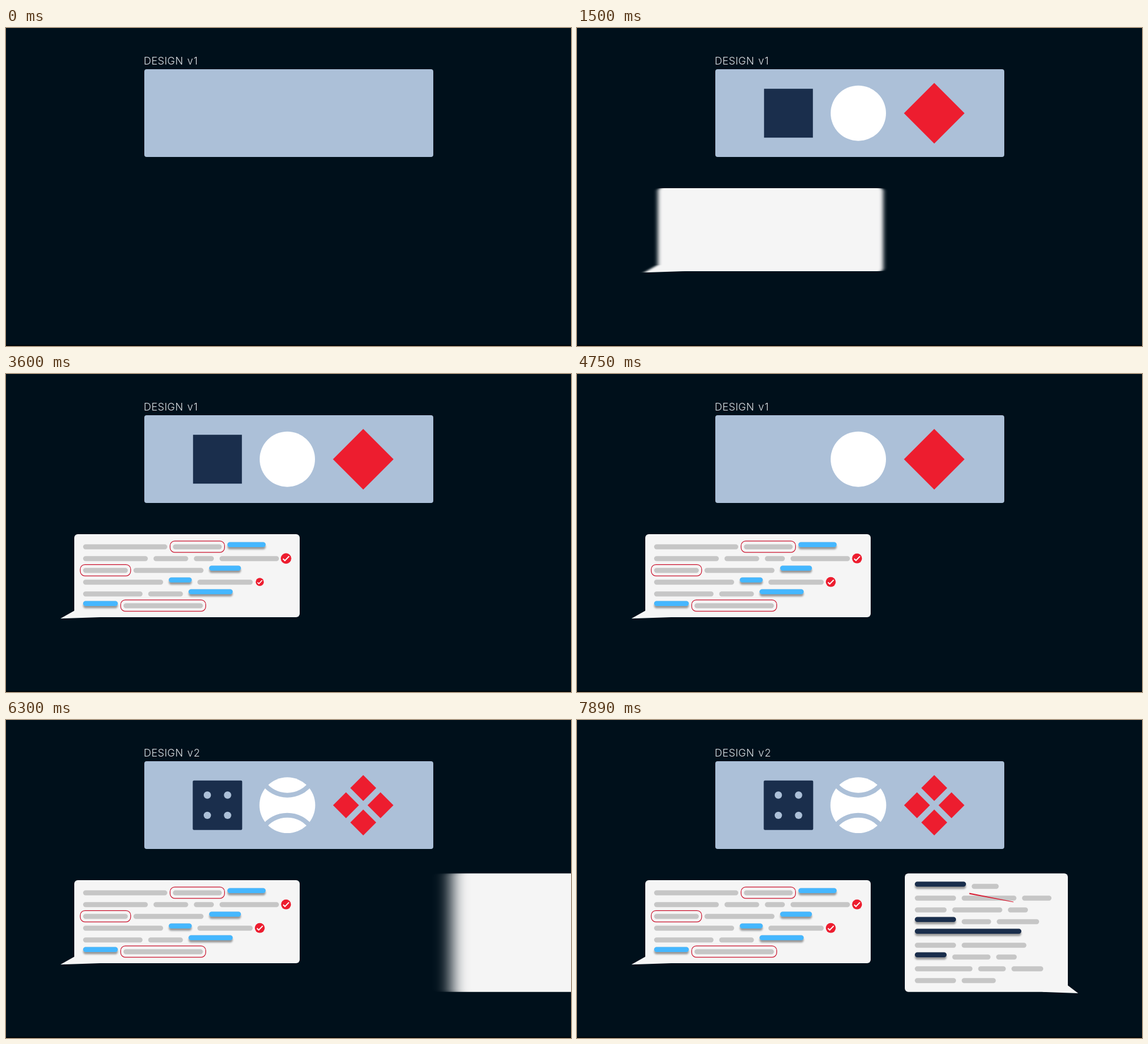
Animation, 960 px wide and 540 px high, one loop 7.99 s. Source, as an HTML page:

```html
<!DOCTYPE html>
<html lang="en">
<head>
<meta charset="utf-8">
<title>Design review</title>
<style>
  html, body { margin: 0; width: 100%; height: 100%; overflow: hidden; background: #00101b; }
  svg { display: block; width: 960px; height: 540px; }
  text { font: 300 17.6px Inter, "Liberation Sans", sans-serif; letter-spacing: 0.3px; fill: #dfe2e6; }
</style>
</head>
<body>
<svg id="stage" viewBox="0 0 960 540" xmlns="http://www.w3.org/2000/svg">
  <defs>
    <filter id="soft" x="-20%" y="-100%" width="140%" height="300%"><feGaussianBlur stdDeviation="1.4"/></filter>
  </defs>
  <rect width="960" height="540" fill="#00101b"/>
  <rect y="538" width="960" height="2" fill="#000509"/>
  <text x="234" y="62">DESIGN</text>
  <text x="308" y="62">v</text>
  <text id="one" x="318.7" y="62">1</text>
  <text id="two" x="318.7" y="62">2</text>
  <rect x="235" y="70" width="491" height="149" rx="4" fill="#acc0d8"/>
</svg>
<script>
const LOOP = 7990, FRAME = 50, TYPING = 30;
const RED = '#ed1d2f', NAVY = '#1a2e4c', BLUE = '#45b7ff', GREY = '#c6c6c6', PANEL = '#acc0d8';
const stage = document.getElementById('stage');
const defs = stage.querySelector('defs');

function set(node, attrs) {
  for (const key in attrs) node.setAttribute(key, attrs[key]);
}
function add(parent, tag, attrs = {}) {
  const node = document.createElementNS('http://www.w3.org/2000/svg', tag);
  set(node, attrs);
  parent.append(node);
  return node;
}
const show = (node, on) => set(node, { visibility: on ? 'visible' : 'hidden' });
const clamp = v => Math.max(0, Math.min(1, v));

// Progress in equal held steps; the first step is already visible at `start`.
const progress = (t, start, steps, hold = FRAME) =>
  clamp((Math.floor((t - start) / hold) + 1) / steps);

// Ease out with an overshoot.
const back = u => 1 + 2.7 * (u - 1) ** 3 + 1.7 * (u - 1) ** 2;

function place(node, x, y, scale) {
  show(node, scale > 0);
  set(node, { transform: `translate(${x} ${y}) scale(${scale})` });
}

// Shapes, each drawn around its own centre.
const diamond = (parent, x, y, r) =>
  add(parent, 'path', { d: `M${x} ${y - r}l${r} ${r}l${-r} ${r}l${-r} ${-r}z`, fill: RED });
const square = (parent, half, rx) =>
  add(parent, 'rect', { x: -half, y: -half, width: 2 * half, height: 2 * half, rx, fill: NAVY });
const disc = (parent, r, fill, cx = 0, cy = 0) => add(parent, 'circle', { cx, cy, r, fill });

const drawPlain = [
  g => square(g, 41.5, 0),
  g => disc(g, 47, '#fff'),
  g => diamond(g, 0, 0, 51.5)
];
const drawDetailed = [
  g => {
    square(g, 42, 2);
    for (const x of [-1, 1]) for (const y of [-1, 1]) disc(g, 6.2, PANEL, x * 17.2, y * 17.2);
  },
  g => {
    disc(g, 47.4, '#fff');
    for (const flip of [-1, 1])
      add(g, 'path', {
        d: 'M-40 -37A50 50 0 0 0 40 -37', transform: `scale(1 ${flip})`,
        fill: 'none', stroke: PANEL, 'stroke-width': 8
      });
  },
  g => {
    for (const side of [-29.3, 29.3]) {
      diamond(g, side, 0, 22);
      diamond(g, 0, side, 22);
    }
  }
];
const shapes = [359.3, 478, 607].map((x, i) => {
  const [plain, detailed] = [drawPlain, drawDetailed].map(draw => {
    const group = add(stage, 'g');
    draw[i](group);
    return group;
  });
  return { x, plain, detailed };
});

// A word is a bar of a given width, optionally with an editing mark.
const mark = kind => width => ({ width, kind });
const key = mark('key'), ring = mark('ring'), tick = mark('tick'), strike = mark('strike');

function makeBubble({ id, x, y, width, height, tip, textX, textY, accent, rows }) {
  const blur = add(add(defs, 'filter', { id: id + 'Blur', x: '-30%', width: '160%' }), 'feGaussianBlur');
  const fade = add(defs, 'linearGradient', { id: id + 'Fade', gradientUnits: 'userSpaceOnUse' });
  for (const offset of [0, 1])
    add(fade, 'stop', { offset, 'stop-color': GREY, 'stop-opacity': 1 - offset });

  const group = add(stage, 'g', { fill: '#f5f5f5' });
  const edge = tip < 0 ? x : x + width;
  const bottom = y + height;
  add(group, 'rect', { x, y, width, height, rx: 6 });
  add(group, 'path', {
    d: `M${edge} ${bottom - 11}L${edge + tip} ${bottom + 2.2}L${edge - Math.sign(tip) * 44} ${bottom}z`
  });

  const marks = { ring: [], tick: [], strike: [] };
  const lines = rows.map((row, i) => {
    const middle = textY + i * 20;
    let end = textX - 9.6;
    const bars = row.map(word => {
      const { width, kind } = word.kind ? word : { width: word };
      const left = end + 9.6;
      const box = { x: left, y: middle - 4.2, width, height: 8.4, rx: 4.2 };
      end = left + width;
      marks[kind]?.push({ left, end, middle });
      const shadow = kind === 'key' && add(group, 'rect', { ...box, fill: '#000', filter: 'url(#soft)' });
      const bar = add(group, 'rect', box);
      const tint = shadow && add(group, 'rect', { ...box, fill: accent });
      return { bar, shadow, tint };
    });
    return { bars, length: end - textX };
  });
  const total = lines.reduce((sum, line) => sum + line.length, 0);

  function slide(t, start, steps, from) {
    const u = progress(t, start + FRAME, steps - 1);
    const offset = from * (1 - back(u));
    const next = from * (1 - back(clamp(u + 1 / (steps - 1))));
    const speed = Math.min(14, Math.abs(next - offset) / 6);
    show(group, t >= start);
    set(blur, { stdDeviation: `${speed} 0` });
    set(group, { transform: `translate(${offset} 0)`, filter: speed ? `url(#${id}Blur)` : 'none' });
  }

  // Words appear at one constant speed with a soft leading edge.
  function write(amount) {
    let rest = amount * total;
    for (const { bars, length } of lines) {
      const done = rest >= length - 0.01;
      const current = !done && rest > 0;
      if (current) set(fade, { x1: textX + rest - 11, x2: textX + rest });
      for (const { bar } of bars)
        set(bar, { fill: done ? GREY : current ? `url(#${id}Fade)` : 'none' });
      rest -= length;
    }
  }

  function lift(amount) {
    for (const { bar, shadow, tint } of lines.flatMap(line => line.bars)) {
      if (!shadow) continue;
      for (const node of [bar, tint]) set(node, { transform: `translate(0 ${-3.7 * amount})` });
      set(tint, { opacity: amount });
      set(shadow, { opacity: 0.38 * amount });
    }
  }
  return { group, marks, slide, write, lift };
}

const comment = makeBubble({
  id: 'comment', x: 116, y: 272, width: 383, height: 141, tip: -23.5,
  textX: 131, textY: 293.5, accent: BLUE,
  rows: [
    [143, ring(83), key(65)],
    [110, 59, 34, tick(101)],
    [ring(76), 119, key(54)],
    [136, key(39), tick(94)],
    [101, 59, key(75)],
    [key(59), ring(135)]
  ]
});
const reply = makeBubble({
  id: 'reply', x: 557, y: 260.5, width: 277, height: 201.3, tip: 17.5,
  textX: 574, textY: 282.5, accent: NAVY,
  rows: [
    [key(87), 46],
    [70, strike(93), 50],
    [54, 85, 34],
    [key(70), 50, 72],
    [key(181)],
    [70, 110],
    [key(54), 65, 35],
    [98, 47, 54],
    [70, 58]
  ]
});

const rings = comment.marks.ring.map(({ left, end, middle }) => add(comment.group, 'rect', {
  x: left - 4.8, y: middle - 9.9, width: end - left + 9.6, height: 19.2, rx: 8,
  fill: 'none', stroke: '#cb1630', 'stroke-width': 1.2, pathLength: 1
}));
const ticks = comment.marks.tick.map(({ end, middle }) => {
  const group = add(comment.group, 'g');
  disc(group, 8.4, RED);
  add(group, 'path', { d: 'M-4.8 0.6L-1.8 3.5L5 -3.6', fill: 'none', stroke: '#fff', 'stroke-width': 1.9 });
  return { group, x: end + 12, y: middle - 0.3 };
});
const cuts = reply.marks.strike.map(({ left, middle }) => ({
  left: left + 13, top: middle - 8, node: add(reply.group, 'path', { fill: '#d81e34' })
}));

const one = document.getElementById('one');
const two = document.getElementById('two');

function render(t) {
  shapes.forEach(({ x, plain, detailed }, i) => {
    const delay = i * FRAME;
    place(plain, x, 144.7, t < 4750 + delay ? back(progress(t, 500 + delay, 2)) : 0);
    place(detailed, x, 144.7, back(progress(t, 5400 + delay, 2)));
  });

  const swap = progress(t, 5050, 4);
  set(one, { opacity: 1 - swap });
  set(two, { opacity: swap });

  comment.slide(t, 1400, 4, -240);
  comment.write(progress(t, 1750, 16, TYPING));
  comment.lift(progress(t, 2700, 2));
  reply.slide(t, 6300, 3, 200);
  reply.write(progress(t, 6730, 27, TYPING));
  reply.lift(progress(t, 7540, 3));

  rings.forEach((node, i) => {
    const drawn = progress(t, 2950 + i * FRAME, 6);
    show(node, drawn > 0);
    set(node, { 'stroke-dasharray': drawn < 1 ? `${drawn} 2` : 'none' });
  });
  ticks.forEach(({ group, x, y }, i) =>
    place(group, x, y, back(progress(t, 3500 + i * 2 * FRAME, 4))));
  cuts.forEach(({ node, left, top }) => {
    const drawn = progress(t, 7840, 2);
    show(node, drawn > 0);
    set(node, { d: `M${left} ${top - 0.9}l${75 * drawn} ${15 * drawn}v1l${-75 * drawn} ${-15 * drawn + 1.2}z` });
  });
}

const begin = performance.now();
function frame(now) {
  render(Math.max(0, now - begin) % LOOP);
  requestAnimationFrame(frame);
}
render(0);
requestAnimationFrame(frame);
</script>
</body>
</html>
```
